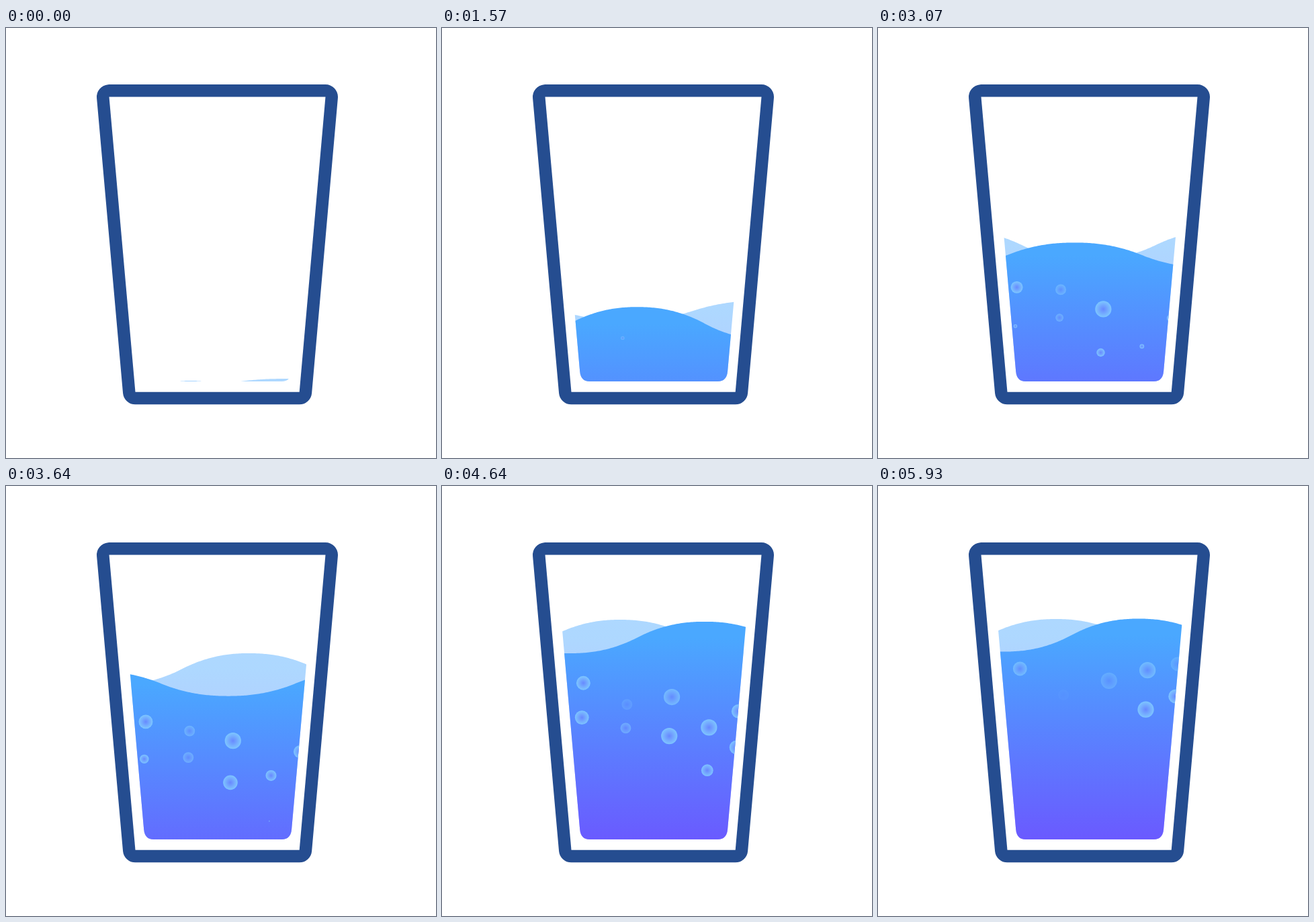
An HTML page with a canvas that plays this animation: 640x640 px, repeating every 6 s.

```html
<!DOCTYPE html>
<html lang="en">
<head>
<meta charset="utf-8">
<title>Filling glass</title>
<style>
  html, body { margin: 0; width: 100%; height: 100%; overflow: hidden; background: #fff; }
  canvas { display: block; width: 100vw; height: 100vh; object-fit: contain; }
</style>
</head>
<body>
<canvas id="stage" width="640" height="640"></canvas>
<script>
const ctx = document.getElementById('stage').getContext('2d');
const LOOP = 6000, STEPS = 84;
const QUARTER = 100;               // quarter wavelength
const GROW = 1500, FADE_AT = 3000, FADE = 1100, DELAY = 895, DRAG = 2.3e-6;
const clamp = v => Math.min(1, Math.max(0, v));

// Both waves run left while the level rises, then settle
const TIMES = [0, 1000, 2210, 3070, 4210, 4800];
const FRONT = {
  alpha: 1,
  crest: [675, 416, 147, -107, -380, -412],
  level: [553.5, 483.5, 392, 338, 252.5, 222],
  height: [28, 26, 22.5, 18.5, 19, 24.5]
};
const BACK = {
  alpha: 0.45,
  crest: [415, 190, -58, -286, -528, -535],
  level: [532, 463.5, 374, 323, 233, 222],
  height: [10, 16.5, 12.5, 22, 24, 24]
};

// Two bubbles rise in each column, one after the other
const COLUMNS = [
  { birth: 1780, x: 203.5, y: 470.5, drift: 0.0024, speed: 0.0685, r: 10.4, alpha: 0.9 },
  { birth: 1060, x: 267.8, y: 488.3, drift: 0.0021, speed: 0.0538, r: 7.9, alpha: 0.55 },
  { birth: 1410, x: 328.2, y: 541.2, drift: 0.0043, speed: 0.0777, r: 12.1, alpha: 0.9 },
  { birth: 2650, x: 391.6, y: 506.5, drift: 0.0029, speed: 0.0784, r: 12.1, alpha: 0.9 },
  { birth: 2270, x: 432.5, y: 485.5, drift: 0.0037, speed: 0.0687, r: 10.4, alpha: 0.9 }
];

// Monotone cubic through the values at TIMES, at rest in the end
function ease(values, t) {
  const n = TIMES.length - 1;
  if (t >= TIMES[n]) return values[n];
  const i = TIMES.findIndex((_, k) => t < TIMES[k + 1]);
  const slope = k => (values[k + 1] - values[k]) / (TIMES[k + 1] - TIMES[k]);
  const tangent = k => {
    if (k === 0) return slope(0);
    if (k === n) return 0;
    const a = slope(k - 1), b = slope(k);
    return a * b <= 0 ? 0 : 2 * a * b / (a + b);
  };
  const span = TIMES[i + 1] - TIMES[i], u = (t - TIMES[i]) / span;
  const d = values[i + 1] - values[i], m0 = tangent(i) * span, m1 = tangent(i + 1) * span;
  return values[i] + u * (m0 + u * (3 * d - 2 * m0 - m1 + u * (m0 + m1 - 2 * d)));
}

// Height of the wave at distance d from its crest, -1 to 1
function wave(d) {
  const length = 4 * QUARTER;
  d = ((d % length) + length) % length;
  d = Math.min(d, length - d) / QUARTER;
  return d < 1 ? 1 - d ** 2.2 : (2 - d) ** 2.2 - 1;
}

function drawWater(water, t) {
  const crest = ease(water.crest, t), level = ease(water.level, t), height = ease(water.height, t);
  const fill = ctx.createLinearGradient(0, level, 0, level + 330);
  fill.addColorStop(0, '#4aa8ff');
  fill.addColorStop(1, '#6d53ff');
  ctx.globalAlpha = water.alpha;
  ctx.fillStyle = fill;
  ctx.beginPath();
  ctx.moveTo(165, 640);
  for (let x = 165; x <= 465; x += 2) ctx.lineTo(x, level - height * wave(x - crest));
  ctx.lineTo(465, 640);
  ctx.fill();
}

function drawBubble(col, age) {
  const fade = 1 - clamp((age - FADE_AT) / FADE);
  if (age <= 0 || fade <= 0) return;
  const x = col.x + col.drift * age;
  const y = col.y - col.speed * age + DRAG * age * age;
  const r = col.r * clamp(age / GROW);
  const fill = ctx.createRadialGradient(x, y, 0, x, y, r);
  fill.addColorStop(0, '#6a88ff');
  fill.addColorStop(1, '#82ccff');
  ctx.globalAlpha = fade * col.alpha;
  ctx.fillStyle = fill;
  ctx.beginPath();
  ctx.arc(x, y, r, 0, 2 * Math.PI);
  ctx.fill();
}

function clipInside() {
  ctx.beginPath();
  ctx.moveTo(173.3, 150);
  ctx.lineTo(205.2, 511);
  ctx.quadraticCurveTo(206.5, 526, 219.5, 526);
  ctx.lineTo(410.5, 526);
  ctx.quadraticCurveTo(423.7, 526, 425.1, 511);
  ctx.lineTo(457.4, 150);
  ctx.closePath();
  ctx.clip();
}

function drawGlass() {
  ctx.beginPath();
  ctx.moveTo(153.5, 102.6);
  ctx.lineTo(475.5, 102.6);
  ctx.lineTo(436.7, 541.8);
  ctx.lineTo(192.5, 541.8);
  ctx.closePath();
  ctx.lineJoin = 'round';
  ctx.lineWidth = 37;
  ctx.strokeStyle = '#254d90';
  ctx.stroke();
  ctx.fillStyle = '#fff';
  ctx.fill();
}

function draw(t) {
  ctx.globalAlpha = 1;
  ctx.fillStyle = '#fff';
  ctx.fillRect(0, 0, 640, 640);
  drawGlass();
  ctx.save();
  clipInside();
  drawWater(BACK, t);
  drawWater(FRONT, t);
  for (const col of COLUMNS) {
    drawBubble(col, t - col.birth);
    drawBubble(col, t - col.birth - DELAY);
  }
  ctx.restore();
}

const start = performance.now();
function tick() {
  const t = (performance.now() - start) % LOOP;
  const step = Math.floor(t * STEPS / LOOP + 0.08) % STEPS;
  draw(step * LOOP / STEPS);
  requestAnimationFrame(tick);
}
tick();
</script>
</body>
</html>
```
